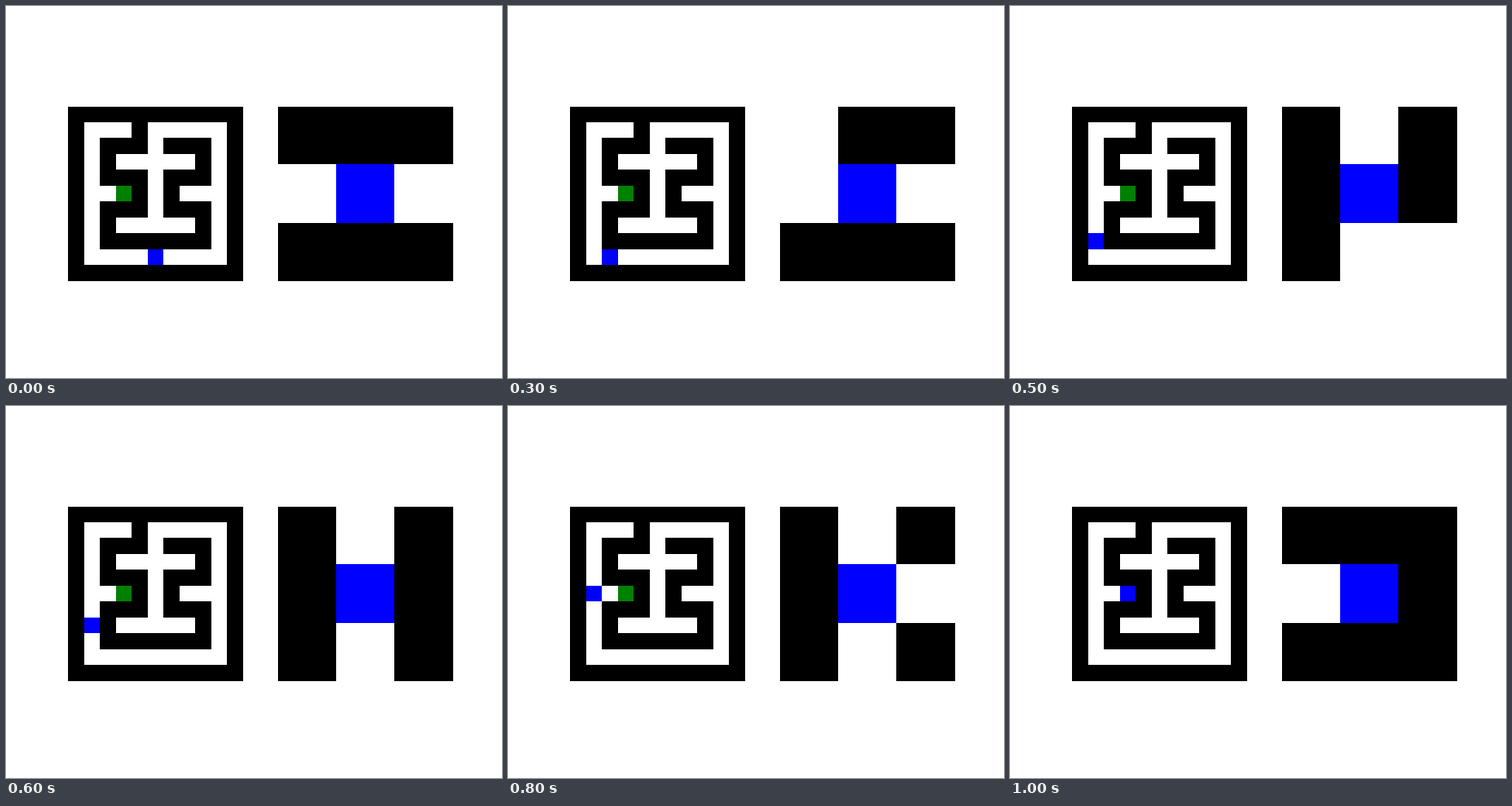
These frames come from a looping animation (640x480 px, 1.1 s). An HTML page with a canvas:

```html
<!DOCTYPE html>
<html>
<head>
<meta charset="utf-8">
<title>Maze walk</title>
<style>
html, body { margin: 0; height: 100%; overflow: hidden; background: #fff; }
canvas { display: block; }
</style>
</head>
<body>
<canvas id="stage" width="640" height="480"></canvas>
<script>
const ctx = document.getElementById('stage').getContext('2d');
const STEP = 100;
const maze = [
  '###########',
  '#...#.....#',
  '#.###.###.#',
  '#.#.....#.#',
  '#.###.###.#',
  '#...#.#...#',
  '#.###.###.#',
  '#.#.....#.#',
  '#.#######.#',
  '#.........#',
  '###########'
];
const goal = [3, 5];

// Walk left along the bottom corridor, up the side, then right to the goal.
const path = [[5, 9]];
for (const move of 'LLLLUUUURR') {
  const [x, y] = path[path.length - 1];
  path.push([x + (move === 'R') - (move === 'L'), y - (move === 'U')]);
}

const edges = (start, size) =>
  Array.from({ length: 12 }, (_, i) => Math.round(start + size * i));
const mapX = edges(80, 20.5), mapY = edges(129.58, 20.45);
const viewX = [351, 426, 501, 577], viewY = [130, 204, 280, 355];

function cellColor(x, y, player) {
  const at = p => p[0] === x && p[1] === y;
  if (at(player)) return '#00f';
  if (at(goal)) return '#008000';
  return maze[y][x] === '#' ? '#000' : '#fff';
}

// Paint a window of the maze whose top-left cell is (left, top).
function drawGrid(xs, ys, left, top, player) {
  for (let r = 0; r < ys.length - 1; r++) {
    for (let c = 0; c < xs.length - 1; c++) {
      ctx.fillStyle = cellColor(left + c, top + r, player);
      ctx.fillRect(xs[c], ys[r], xs[c + 1] - xs[c], ys[r + 1] - ys[r]);
    }
  }
}

function draw() {
  const player = path[Math.floor(performance.now() / STEP) % path.length];
  ctx.fillStyle = '#fff';
  ctx.fillRect(0, 0, 640, 480);
  drawGrid(mapX, mapY, 0, 0, player);
  drawGrid(viewX, viewY, player[0] - 1, player[1] - 1, player);
  requestAnimationFrame(draw);
}
draw();
</script>
</body>
</html>
```
